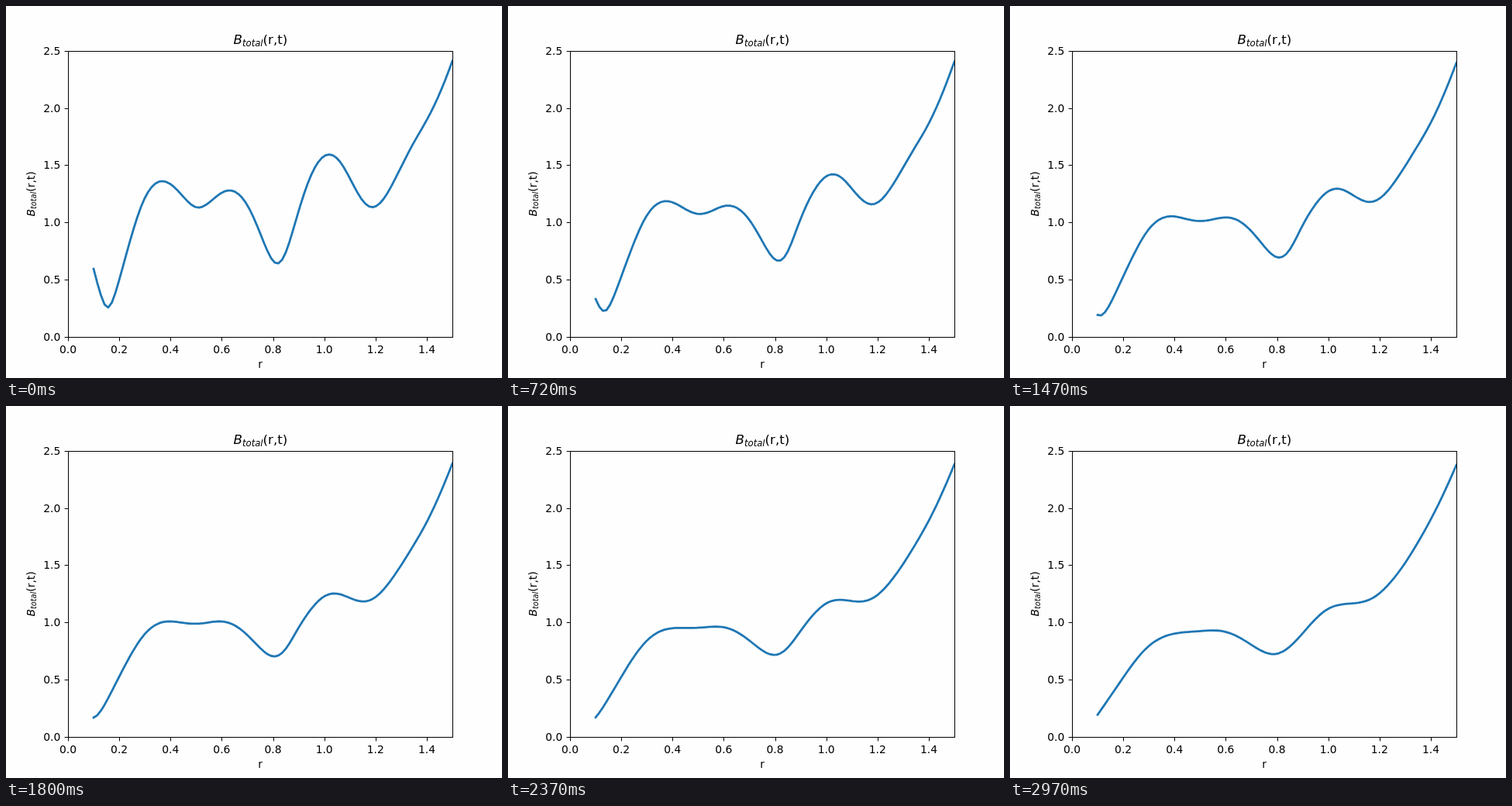
An HTML page that plays this animation: 640 by 480 pixels, repeating every 3 s.

```html
<!DOCTYPE html>
<html>
<head>
<meta charset="utf-8">
<style>
html, body { margin: 0; width: 100%; height: 100%; overflow: hidden; background: #fefefe; }
svg { display: block; font: 13.89px "DejaVu Sans", sans-serif; }
.mid { text-anchor: middle; }
.end { text-anchor: end; }
.var { font-style: oblique; }
.sub { font-style: oblique; font-size: 70%; }
.axis { fill: none; stroke: #000; stroke-width: 1; }
#curve { fill: none; stroke: #1f77b4; stroke-width: 2.78; stroke-linejoin: round; stroke-linecap: square; }
</style>
</head>
<body>
<svg width="640" height="480" viewBox="0 0 640 480">
  <clipPath id="box"><rect x="80" y="57.6" width="496" height="369.6"/></clipPath>
  <path id="curve" clip-path="url(#box)"/>
  <path id="ticks" class="axis"/>
  <rect class="axis" x="80.5" y="58.5" width="496" height="369"/>
  <g id="labels"></g>
  <text class="mid" x="328" y="467">r</text>
  <text class="mid" x="328.4" y="49" font-size="16.67"><tspan class="var">B</tspan><tspan class="sub" dy="2.7">total</tspan><tspan dy="-2.7">(r,t)</tspan></text>
  <text class="mid" transform="translate(37 242.4) rotate(-90)"><tspan class="var">B</tspan><tspan class="sub" dy="2.3">total</tspan><tspan dy="-2.3">(r,t)</tspan></text>
</svg>
<script>
const LOOP = 3000, STEP = 30, POINTS = 100;
const R0 = 0.1, R1 = 1.5, GAP = 0.05, DECAY = 0.6;
const toX = r => 80 + r * 496 / 1.5;
const toY = b => 427.2 - b * 369.6 / 2.5;
const snap = v => Math.floor(v + 0.5) + 0.5;

// Field strength every 0.05 in r, at three moments (s)
const poses = [
  { t: 0, b: [.595, .262, .5, .9, 1.215, 1.352, 1.335, 1.225, 1.133, 1.173, 1.26, 1.27, 1.15, .905, .665,
    .74, 1.1, 1.42, 1.58, 1.56, 1.385, 1.19, 1.14, 1.27, 1.485, 1.7, 1.895, 2.125, 2.41] },
  { t: 1.05, b: [.255, .272, .53, .795, 1.005, 1.108, 1.117, 1.075, 1.047, 1.065, 1.097, 1.075, .975, .815, .685,
    .755, 1.005, 1.215, 1.34, 1.35, 1.265, 1.18, 1.19, 1.31, 1.485, 1.67, 1.865, 2.11, 2.4] },
  { t: 2.97, b: [.195, .357, .52, .675, .795, .868, .903, .917, .925, .931, .918, .873, .805, .742, .727,
    .79, .905, 1.03, 1.12, 1.157, 1.168, 1.19, 1.255, 1.37, 1.52, 1.7, 1.9, 2.125, 2.375] }
];

// Cubic spline with parabolic ends
function spline(v) {
  const n = v.length - 1, m = v.map(() => 0);
  for (let pass = 0; pass < 40; pass++) {
    for (let i = 1; i < n; i++)
      m[i] = (6 * (v[i - 1] - 2 * v[i] + v[i + 1]) - m[i - 1] - m[i + 1]) / 4;
    m[0] = m[1];
    m[n] = m[n - 1];
  }
  return u => {
    const i = Math.min(n - 1, Math.floor(u)), q = u - i, p = 1 - q;
    return p * v[i] + q * v[i + 1] + ((p ** 3 - p) * m[i] + (q ** 3 - q) * m[i + 1]) / 6;
  };
}

// Energy (field squared) is quadratic in the decay factor
const decay = t => Math.exp(-DECAY * t);
const nodes = poses.map(p => decay(p.t));
const radii = Array.from({ length: POINTS }, (_, i) => R0 + (R1 - R0) * i / (POINTS - 1));
const energy = poses.map(p => {
  const f = spline(p.b.map(b => b * b));
  return radii.map(r => f((r - R0) / GAP));
});

function weights(s) {
  return nodes.map((a, i) =>
    nodes.reduce((w, c, j) => i === j ? w : w * (s - c) / (a - c), 1));
}

const curve = document.getElementById("curve");
function draw(ms) {
  const w = weights(decay(ms / 1000));
  const pts = radii.map((r, i) => {
    const e = w.reduce((sum, k, j) => sum + k * energy[j][i], 0);
    return toX(r).toFixed(2) + " " + toY(Math.sqrt(Math.max(0, e))).toFixed(2);
  });
  curve.setAttribute("d", "M" + pts.join("L"));
}

function drawAxes() {
  let d = "", text = "";
  for (let i = 0; i < 8; i++) {
    const x = toX(i * 0.2);
    d += `M${snap(x)} 428v4.4`;
    text += `<text class="mid" x="${x}" y="448">${(i * 0.2).toFixed(1)}</text>`;
  }
  for (let i = 0; i < 6; i++) {
    const y = snap(toY(i * 0.5));
    d += `M80 ${y}h-4.4`;
    text += `<text class="end" x="70.3" y="${y + 4.5}">${(i * 0.5).toFixed(1)}</text>`;
  }
  document.getElementById("ticks").setAttribute("d", d);
  document.getElementById("labels").innerHTML = text;
}

const start = performance.now();
function tick() {
  const ms = (performance.now() - start) % LOOP;
  draw(Math.floor(ms / STEP) * STEP);
  requestAnimationFrame(tick);
}
drawAxes();
tick();
</script>
</body>
</html>
```
